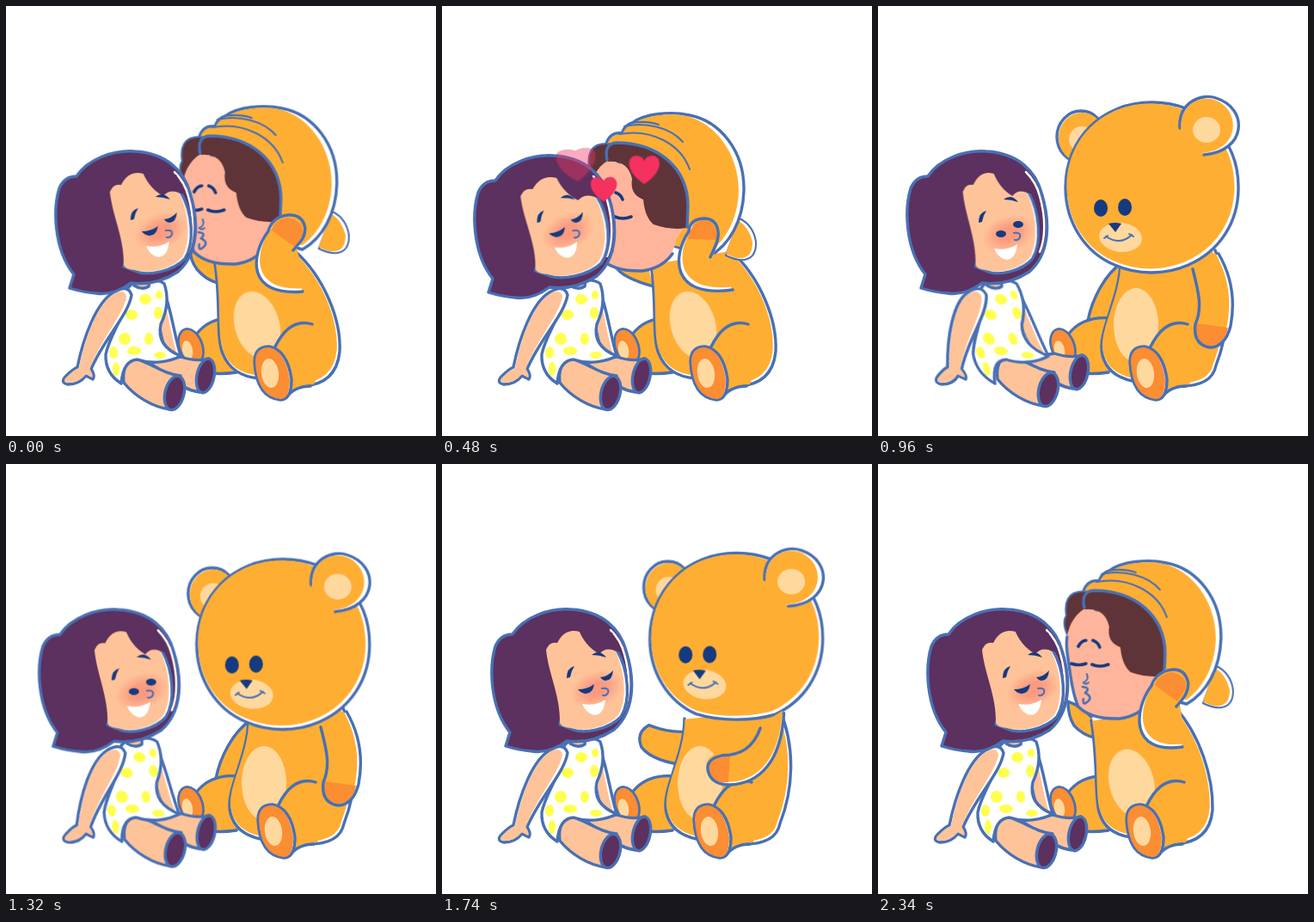
An HTML page without scripts that plays this animation: 500x500 px, repeating every 2400 ms.

```html
<!DOCTYPE html>
<html lang="en">
<head>
<meta charset="utf-8">
<title>Bear hug</title>
<style>
html, body { margin: 0; width: 100%; height: 100%; overflow: hidden; background: #fff; }
svg { display: block; width: 100%; height: 100%; }
svg * { animation: 2.4s linear infinite; }

.ink { fill: #fff; stroke: #4870b4; stroke-width: 3.4; stroke-linecap: round; stroke-linejoin: round; }
.bare { fill: none; }
.thin { stroke-width: 2; }
.tint { transform-box: fill-box; transform-origin: 25% 25%; transform: scale(.97); }
.orange { fill: #ffae34; }
.paw { fill: #fb8d33; }
.cream { fill: #ffd89e; }
.skin { fill: #ffc399; }
.pink { fill: #ffb59b; }
.plum { fill: #5c305f; }
.brown { fill: #5f3439; }
.navy { fill: #153a80; }
.lash { fill: none; stroke: #153a80; stroke-width: 3.6; stroke-linecap: round; }

/* girl */
.girl-legs { animation-name: lift; }
.girl-body { transform-origin: 158px 430px; animation-name: sway; }
.girl-head { animation-name: nod; transform-origin: 158px 315px; }
.girl-skin { transform-origin: 216px 250px; animation-name: turn; }
.girl-face { transform-origin: 176px 270px; animation-name: gaze; }
.open-eyes { animation-name: wake; animation-timing-function: step-end; }
.closed-eyes { animation-name: doze; animation-timing-function: step-end; }
@keyframes lift { 0%, 32.5%, 58%, 100% { transform: none; } 40%, 50% { transform: translate(2px, -4px); } }
@keyframes sway { 0%, 32.5%, 58%, 100% { transform: none; } 40%, 50% { transform: skewX(12deg); } }
@keyframes nod {
  0%, 71%, 100% { transform: none; }
  2.5% { transform: translate(-10px, 2px); }
  6%, 20% { transform: translate(-20px, 5px); }
  22.5% { transform: translate(-22px, 5px); }
  32.5% { transform: translate(0, 2px) rotate(5deg); }
  40% { transform: translate(-24px, 0); }
  45%, 50% { transform: translate(-27px, 0); }
  65% { transform: translate(-4px, 1px); }
}
@keyframes turn {
  0%, 32.5%, 65%, 100% { transform: none; }
  6%, 22.5% { transform: translateX(-2px) scaleX(1.08); }
  40%, 50% { transform: translateX(-5px) scaleX(.93); }
}
@keyframes gaze {
  0%, 70%, 100% { transform: none; }
  6%, 22.5% { transform: translate(-13px, -4px) rotate(-4deg); }
  32.5% { transform: translate(-3px, 5px); }
  40%, 50% { transform: translate(-4px, 3px); }
}
@keyframes wake { 0% { visibility: hidden; } 36% { visibility: visible; } 56% { visibility: hidden; } }
@keyframes doze { 0% { visibility: visible; } 36% { visibility: hidden; } 56% { visibility: visible; } }

/* body and limbs */
.body { animation-name: lean; }
.belly { transform-origin: 300px 371px; animation-name: belly; }
.front-leg { animation-name: shuffle; }
.back-arm { animation-name: back-reach; }
.back-paw { animation-name: back-paw; animation-timing-function: step-end; }
.front-arm { animation-name: reach; }
.sleeve { animation-name: sleeve; }
.front-paw { animation-name: grip; }
@keyframes lean {
  0%, 22.5% { d: path("M243 300C250 345 244 385 252 404Q262 430 294 433L345 442Q384 440 388 402C390 365 370 315 335 284"); }
  30%, 88% { d: path("M282 296C282 340 254 380 261 406Q267 430 296 436L345 442Q388 444 393 418C408 380 412 330 392 284"); }
  97.5% { d: path("M248 298C256 345 252 385 257 404Q264 430 294 434L345 442Q386 440 389 402C390 365 375 315 345 282"); }
  100% { d: path("M243 300C250 345 244 385 252 404Q262 430 294 433L345 442Q384 440 388 402C390 365 370 315 335 284"); }
}
@keyframes belly { 0%, 22.5%, 100% { transform: translate(-8px, 0) rotate(-16deg) scale(1, .93); } 30%, 90% { transform: none; } 97.5% { transform: translate(-5px, 0) rotate(-14deg) scale(1, .93); } }
@keyframes shuffle { 0%, 22.5%, 97.5%, 100% { transform: translateX(-4px); } 30%, 90% { transform: none; } }
@keyframes back-reach {
  0%, 100% { d: path("M243 296C236 290 225 285 214 282Q214 295 222 306Q232 318 246 322"); }
  6%, 22.5% { d: path("M240 305C230 300 215 300 200 300Q205 310 218 316Q230 322 246 326"); }
  27.5% { d: path("M290 260C280 250 262 250 245 250Q236 275 250 300Q262 316 292 317"); }
  32.5% { d: path("M287 316C265 319 252 314 240 309Q224 316 230 332Q244 350 288 354"); }
  39%, 67% { d: path("M284 298C264 312 249 340 244 366Q246 380 258 378Q270 372 286 340"); }
  72% { d: path("M287 316C265 319 252 314 240 309Q224 316 230 332Q244 350 288 354"); }
  78%, 85% { d: path("M290 260C280 250 262 250 245 250Q236 275 250 300Q262 316 292 317"); }
  97.5% { d: path("M248 294C241 286 232 280 221 276Q221 293 228 304Q238 315 252 318"); }
}
@keyframes back-paw { 0% { visibility: hidden; } 31% { visibility: visible; } 35% { visibility: hidden; } }
@keyframes reach {
  0%, 100% { d: path("M334 284C345 272 348 268 348 258Q345 242 328 243Q310 245 305 262C284 290 280 338 345 332"); }
  6%, 22.5% { d: path("M312 292C320 275 322 270 321 262Q319 247 304 247Q288 248 287 262C268 290 265 340 338 330"); }
  27.5% { d: path("M372 278C360 272 366 265 364 256Q360 236 346 237Q332 238 329 262C316 295 318 335 394 308"); }
  32.5% { d: path("M370 310C362 336 345 346 322 347Q300 354 306 370Q312 386 334 384C376 380 402 345 398 288"); }
  39%, 67% { d: path("M366 306C372 330 378 350 369 370Q366 394 386 397Q404 396 410 372C416 340 410 312 396 288"); }
  72% { d: path("M370 310C362 336 345 346 322 347Q300 354 306 370Q312 386 334 384C376 380 402 345 398 288"); }
  78%, 86% { d: path("M372 278C360 272 366 265 364 256Q360 236 346 237Q332 238 329 262C316 295 318 335 394 308"); }
  97.5% { d: path("M347 282C358 270 361 264 361 255Q358 238 342 239Q324 241 318 258C298 285 292 338 354 329"); }
}
@keyframes sleeve {
  0%, 27.5%, 78%, 100% { transform: translate(4px, -4px); }
  32.5%, 72% { transform: translate(-2px, -3px); }
  39%, 67% { transform: translate(-4px, -1px); }
}
@keyframes grip {
  0%, 100% { d: path("M336 280Q358 254 328 246Q313 248 309 261Z"); }
  6%, 22.5% { d: path("M320 272Q319 249 304 249Q290 250 286 271Z"); }
  27.5% { d: path("M364 260Q360 239 346 239Q333 242 331 261Z"); }
  32.5% { d: path("M332 347Q300 354 307 370Q312 384 333 381Z"); }
  39%, 67% { d: path("M370 369Q368 394 386 395Q403 394 407 374Z"); }
  72% { d: path("M332 347Q300 354 307 370Q312 384 333 381Z"); }
  78%, 86% { d: path("M364 260Q360 239 346 239Q333 242 331 261Z"); }
  97.5% { d: path("M348 276Q371 250 342 242Q327 244 322 257Z"); }
}

/* bear head */
.bear-head { transform-origin: 327px 207px; animation-name: bob; }
.bear-show { animation-name: bear-show; animation-timing-function: step-end; }
.skull { animation-name: tip; }
.bear-face { transform-origin: 283px 245px; animation-name: look-up; }
.near-ear { transform-origin: 394px 135px; animation-name: near-ear; }
.far-ear { animation-name: far-ear; }
@keyframes bear-show { 0% { visibility: hidden; } 25% { visibility: visible; } 86% { visibility: hidden; } }
@keyframes bob {
  0%, 25% { transform: translate(20px, -12px) rotate(10deg); }
  27.5% { transform: translate(4px, 2px); }
  32.5% { transform: translate(-7px, 14px) rotate(-7deg); }
  40% { transform: translate(-9px, 4px); }
  45%, 50% { transform: translate(-8px, 4px); }
  65%, 82.5% { transform: none; }
  70% { transform: translate(20px, -6px); }
  77.5% { transform: translate(4px, 0); }
  86%, 100% { transform: translate(30px, -14px) rotate(14deg); }
}
@keyframes tip {
  0%, 27.5% { d: path("M228 210C232 150 275 101 335 101C395 101 431 145 430 205C428 240 415 262 398 275C375 220 280 225 238 262C222 240 226 220 228 210Z"); }
  31%, 72% { d: path("M227 207C227 150 270 108 327 108C385 108 428 150 428 207C428 248 406 281 370 297C343 309 311 309 284 297C250 283 227 248 227 207Z"); }
  80%, 100% { d: path("M228 210C232 150 275 101 335 101C395 101 431 145 430 205C428 240 415 262 398 275C375 220 280 225 238 262C222 240 226 220 228 210Z"); }
}
@keyframes look-up { 0%, 27.5%, 80%, 100% { transform: translate(5px, -71px) rotate(20deg); } 31%, 72% { transform: none; } }
@keyframes near-ear { 0%, 27.5%, 80%, 100% { transform: translate(9px, 13px) rotate(12deg) scale(1, .82); } 31%, 72% { transform: none; } }
@keyframes far-ear { 0%, 27.5%, 80%, 100% { transform: translate(44px, -12px); } 31%, 72% { transform: none; } }

/* boy head */
.boy { transform-origin: 300px 290px; animation-name: kiss; }
.boy-show { animation-name: boy-show; animation-timing-function: step-end; }
@keyframes boy-show { 0% { visibility: visible; } 25% { visibility: hidden; } 86% { visibility: visible; } }
@keyframes kiss {
  0%, 100% { transform: none; }
  2.5% { transform: translate(-20px, 4px); }
  6% { transform: translate(-33px, 8px); }
  20%, 22.5% { transform: translate(-34px, 8px); }
  25% { transform: translate(20px, 0); }
  86% { transform: translate(50px, -10px); }
  91% { transform: translate(70px, -10px) rotate(5deg); }
  95% { transform: translate(40px, -8px) rotate(2deg); }
  97.5% { transform: translate(14px, -4px); }
}

/* hearts */
.heart { opacity: 0; fill: #f5325f; stroke: #c82c55; stroke-width: .8; animation-name: float; animation-delay: var(--wait);
  d: path("M0 16C-22 2-19-15-9-15Q-2-15 0-9Q2-15 9-15C19-15 22 2 0 16Z"); }
@keyframes float {
  0% { translate: var(--from); scale: .2; rotate: 0deg; opacity: 1; }
  5% { scale: .9; }
  7.5% { scale: 1.05; rotate: 0deg; }
  10% { opacity: 1; d: path("M0 16C-22 2-19-15-9-15Q-2-15 0-9Q2-15 9-15C19-15 22 2 0 16Z"); }
  17.5% { scale: 1.3; rotate: var(--tilt); opacity: .42; d: path("M0 16C-22 2-19-11-14-12Q-6-14 0-11Q6-14 14-12C19-11 22 2 0 16Z"); }
  20% { opacity: .15; }
  21%, 100% { translate: var(--to); scale: 1.3; rotate: var(--tilt); opacity: 0; d: path("M0 16C-22 2-19-11-14-12Q-6-13 0-12Q6-13 14-12C19-11 22 2 0 16Z"); }
}
</style>
</head>
<body>
<svg viewBox="0 0 500 500">
  <defs>
    <radialGradient id="blush">
      <stop offset=".35" stop-color="#fa967d" stop-opacity=".9"/>
      <stop offset="1" stop-color="#fa967d" stop-opacity="0"/>
    </radialGradient>
  </defs>

  <!-- bear costume -->
  <path class="back-arm ink orange"/>
  <path class="back-paw paw" d="M256 317Q246 314 240 311Q226 317 232 331Q240 340 253 343Q260 328 256 317Z"/>
  <path class="orange" d="M272 363Q236 360 220 384L222 420Q240 430 272 426Z"/>
  <path class="ink bare" d="M270 363Q238 360 221 382M230 426Q248 429 268 426"/>
  <ellipse class="ink" cx="215" cy="396" rx="13" ry="21" transform="rotate(-20 215 396)"/>
  <ellipse class="paw" cx="215" cy="396" rx="12" ry="20" transform="rotate(-20 215 396)"/>
  <ellipse class="cream" cx="211" cy="400" rx="6" ry="11" transform="rotate(-12 211 400)"/>
  <path class="body ink"/>
  <path class="body tint orange"/>
  <ellipse class="belly cream" cx="300" cy="371" rx="26" ry="43" transform="rotate(4 300 371)"/>
  <g class="front-leg">
    <path class="orange" d="M360 371Q332 366 317 396L328 456Q342 440 362 440Q380 400 360 371Z"/>
    <path class="ink bare" d="M360 370Q334 362 317 396M330 455Q340 442 358 442"/>
    <path class="ink" d="M293 414Q293 396 310 396Q331 400 336 434Q336 458 323 458Q295 455 293 414Z"/>
    <path class="paw" d="M294 414Q294 397 310 397Q329 401 334 434Q334 457 323 457Q296 454 294 414Z"/>
    <ellipse class="cream" cx="311" cy="427" rx="10" ry="17" transform="rotate(-8 311 427)"/>
  </g>

  <!-- boy in the pushed-back hood -->
  <g class="boy"><g class="boy-show">
    <path class="ink thin" d="M364 282C384 292 400 288 399 266Q396 247 380 239Z"/>
    <path class="orange" d="M364 280C382 290 396 286 395 266Q391 249 378 241Z"/>
    <path class="ink" d="M225 152Q230 138 243 140Q247 130 255 128C270 117 300 114 322 119C357 126 386 160 385 207C384 242 368 270 345 283L300 270Z"/>
    <path class="orange" d="M227 151Q231 140 244 141Q248 131 256 129C270 119 298 116 318 120C350 127 379 162 379 207C378 240 364 264 345 278L300 270Z"/>
    <path class="ink bare thin" d="M240 141C278 134 312 153 322 182M246 132C272 126 300 134 314 150M254 128Q272 125 286 130"/>
    <path class="ink thin brown" d="M206 202Q200 188 205 180Q202 160 214 154Q224 150 238 154L232 186Z"/>
    <path class="pink" d="M228 171Q206 184 205 215C210 250 212 270 219 286Q234 301 267 300Q300 296 307 262L318 246L270 215L254 180Z"/>
    <path class="ink bare" d="M206 205Q205 212 206 222C210 250 212 270 219 286Q234 301 267 300Q290 297 302 280"/>
    <path class="brown" d="M227 173Q222 152 237 151C283 152 319 180 319 225L318 250Q300 253 280 246Q270 238 268 217Q252 211 255 193Q250 171 227 173Z"/>
    <path class="ink bare" d="M226 171Q222 152 237 151C285 151 320 180 320 225L319 249"/>
    <path class="lash" d="M219 216Q223 209 228 209M236 209Q242 211 244 217M211 236Q220 239 228 236M235 237Q244 241 254 237"/>
    <path class="ink bare thin" d="M229 248Q232 255 225 258Q228 261 231 258"/>
    <path class="ink bare" style="stroke-width:2.6" d="M224 263Q234 264 227 270Q237 275 229 281Q224 285 225 277"/>
  </g></g>

  <!-- bear head -->
  <g class="bear-head"><g class="bear-show">
    <g class="far-ear">
      <ellipse class="ink" cx="245" cy="148" rx="28" ry="30"/>
      <ellipse class="orange" cx="246" cy="149" rx="27" ry="29"/>
      <ellipse class="cream" cx="246" cy="151" rx="15" ry="15"/>
    </g>
    <path class="ink pink" d="M268 246Q290 284 322 293L374 272L360 235L275 230Z"/>
    <ellipse class="navy" cx="289" cy="252" rx="5" ry="10" transform="rotate(20 289 252)"/>
    <path class="ink bare thin" d="M297 261Q305 260 302 267L298 268"/>
    <path fill="#fff" d="M306 270L325 264L320 280Q310 278 306 270Z"/>
    <path class="skull ink"/>
    <path class="skull tint orange"/>
    <g class="near-ear">
      <path class="ink" d="M360 138C358 108 385 97 402 103C440 115 438 165 388 169"/>
      <path class="orange" d="M361 140C360 110 383 100 400 105C431 116 431 163 386 167L362 168Z"/>
      <ellipse class="cream" cx="391" cy="140" rx="16" ry="15"/>
    </g>
    <g class="bear-face">
      <ellipse class="cream" cx="291" cy="265" rx="25" ry="17" transform="rotate(6 291 265)"/>
      <ellipse class="navy" cx="268" cy="231" rx="8" ry="10"/>
      <ellipse class="navy" cx="296" cy="230" rx="8" ry="10"/>
      <path class="navy" d="M277 249Q285 247 292 249L285 259Z"/>
      <path class="ink bare thin" d="M274 264Q291 275 304 262M272 266L276 263M301 261L306 264"/>
    </g>
  </g></g>

  <path class="front-arm" fill="#fff"/>
  <g class="sleeve"><path class="front-arm orange"/></g>
  <path class="front-paw paw"/>
  <path class="front-arm ink bare"/>

  <!-- girl -->
  <g class="girl-body">
    <path class="ink" d="M184 333C192 352 196 385 204 410L190 405C184 390 178 370 180 350Z"/>
    <path class="skin" d="M182 336C188 352 192 385 200 408L189 404C183 390 178 370 180 350Z"/>
  </g>
  <g class="girl-legs">
    <path class="ink skin" d="M165 414L203 408Q222 414 236 410L225 449Q205 446 190 430Z"/>
    <ellipse class="ink plum" cx="232" cy="430" rx="10" ry="20" transform="rotate(12 232 430)"/>
    <path class="ink skin" d="M137 438Q134 411 154 411C172 418 185 428 203 430L190 469C170 466 150 454 137 438Z"/>
    <ellipse class="ink plum" cx="196" cy="450" rx="11" ry="20" transform="rotate(14 196 450)"/>
  </g>
  <g class="girl-body">
    <path class="ink" d="M147 323Q136 330 140 345C135 365 120 385 116 405Q115 427 134 439Q136 412 153 411C170 417 190 414 203 407C186 400 176 388 180 370C187 355 190 340 184 323Q178 318 168 319Z"/>
    <g fill="#ffff4f">
      <ellipse cx="162" cy="341" rx="7" ry="6"/><ellipse cx="178" cy="336" rx="4" ry="5"/>
      <ellipse cx="146" cy="359" rx="7" ry="6"/><ellipse cx="177" cy="357" rx="5" ry="7"/>
      <ellipse cx="138" cy="387" rx="7" ry="7"/><ellipse cx="166" cy="387" rx="5" ry="7"/>
      <ellipse cx="125" cy="403" rx="5" ry="7"/><ellipse cx="149" cy="401" rx="8" ry="5"/>
      <ellipse cx="179" cy="406" rx="7" ry="4"/><ellipse cx="128" cy="422" rx="4" ry="8"/>
    </g>
    <path class="ink skin" d="M151 306L149 325Q158 331 166 326L168 306Z"/>
    <path class="ink" d="M125 333Q142 323 146 336C142 360 115 385 99 422Q104 430 101 434L93 430Q85 440 72 440Q62 438 70 430Q78 422 83 420C90 385 105 345 125 333Z"/>
    <path class="skin" d="M125 335Q138 328 140 338C137 358 112 385 97 422Q102 429 100 432L93 428Q85 438 73 438Q64 437 71 431Q79 423 85 421C92 385 107 346 125 335Z"/>
  </g>

  <g class="girl-head">
    <path class="ink plum" d="M74 328L79 312C55 282 55 235 62 212Q68 198 82 198C95 178 125 167 150 169C187 171 207 192 214 217C226 255 222 290 200 309C180 322 160 324 145 322Q125 337 105 334Q90 333 74 328Z"/>
    <path fill="none" stroke="#fff" stroke-width="2.5" stroke-linecap="round" d="M196 193Q208 205 212 221C219 245 219 270 212 286"/>
    <g class="girl-skin">
      <path class="ink" d="M203 216C217 240 220 275 208 294C195 308 165 315 150 308L137 303L160 220Z"/>
      <path class="skin" d="M121 216Q125 206 134 208Q143 190 160 195Q166 206 174 213Q190 211 201 217C213 240 216 274 205 292C193 306 165 312 150 307Q138 306 137 301C138 270 124 245 121 216Z"/>
      <path class="plum" d="M158 190Q165 211 183 221Q190 211 207 219L198 196Z"/>
    </g>
    <g class="girl-face">
      <ellipse cx="180" cy="262" rx="32" ry="21" fill="url(#blush)" transform="rotate(-20 180 262)"/>
      <path class="navy" d="M145 249Q145 237 154 235Q150 241 149 248ZM174 222Q183 215 191 225Q183 222 174 222Z"/>
      <path class="closed-eyes navy" d="M158 262Q169 262 177 256Q175 268 166 267Q161 266 158 262ZM184 248Q193 247 199 240Q198 252 190 252Q186 251 184 248Z"/>
      <g class="open-eyes navy">
        <ellipse cx="171" cy="262" rx="6" ry="4"/><ellipse cx="191" cy="251" rx="6" ry="4"/>
      </g>
      <path class="ink bare thin" d="M186 261Q195 260 193 266Q191 270 187 269"/>
      <path fill="#fff" d="M163 279Q178 282 190 274Q188 291 178 292Q168 291 163 279Z"/>
    </g>
  </g>

  <path class="heart" style="--wait:.06s;--from:178px 240px;--to:152px 172px;--tilt:-5deg"/>
  <path class="heart" style="--wait:.36s;--from:178px 239px;--to:219px 130px;--tilt:-32deg"/>
  <path class="heart" style="--wait:.3s;--from:213px 222px;--to:275px 133px;--tilt:-16deg"/>
</svg>
</body>
</html>
```
